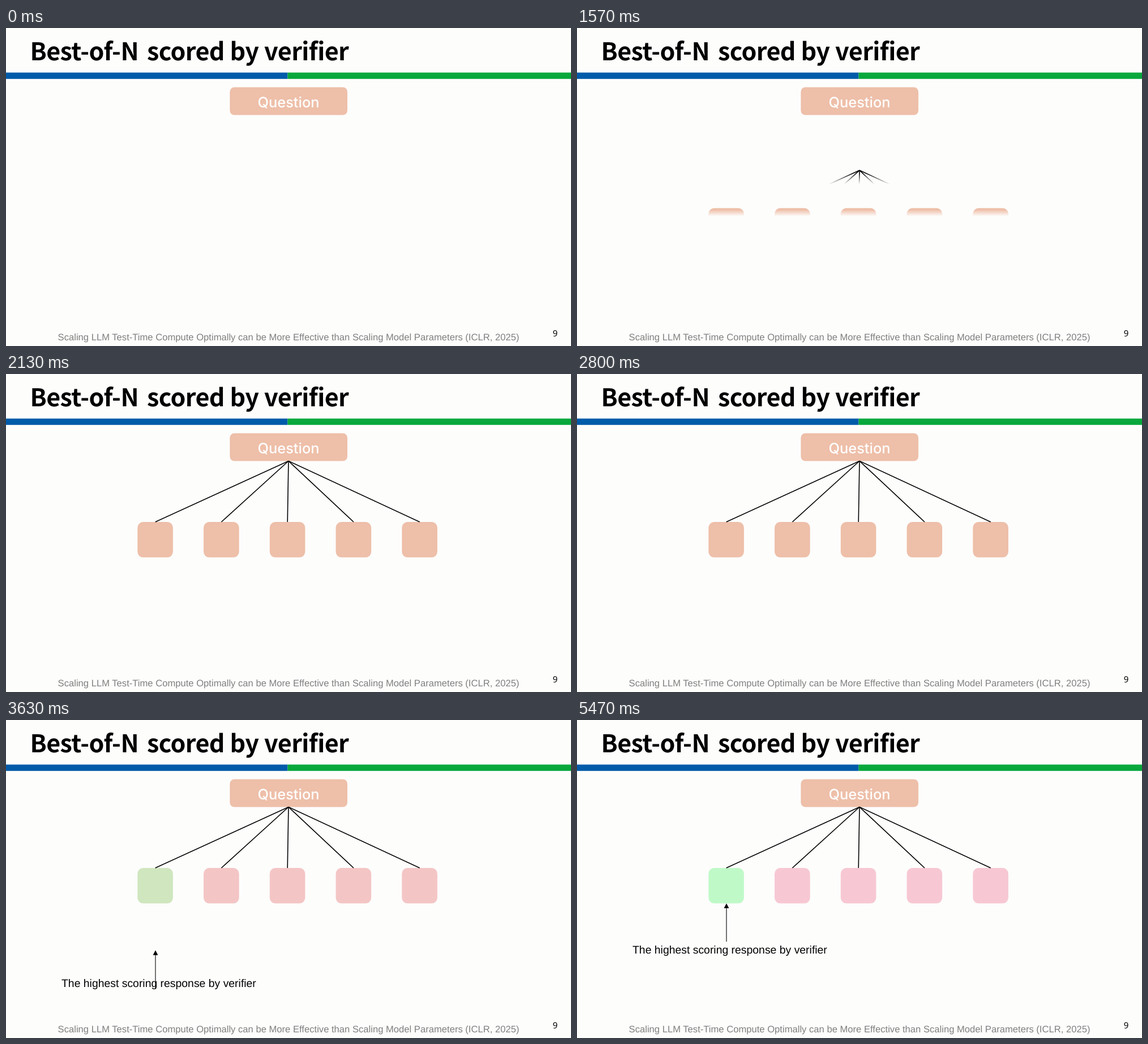
Write an HTML page that moves like this. It is 998x561 px and loops after 5510 ms.

```html
<!DOCTYPE html>
<html lang="en">
<head>
<meta charset="utf-8">
<title>Best-of-N scored by verifier</title>
<style>
  html, body { margin: 0; width: 100%; height: 100%; overflow: hidden; background: #fdfdfc; }
  svg { display: block; width: 998px; height: 561px; }
  text { text-rendering: geometricPrecision; }
  .title { font: 700 43px "Noto Sans CJK KR", "Noto Sans CJK JP", "Noto Sans CJK", "Noto Sans", sans-serif; letter-spacing: -0.6px; }
  .question { font: 500 25.4px Inter, sans-serif; fill: #fff; text-anchor: middle; }
  .cite { font: 16.63px "Liberation Sans", Arial, sans-serif; fill: #7f7f7f; text-anchor: middle; }
  .page { font: 15px "Noto Sans", sans-serif; text-anchor: middle; }
  .note { font: 19.4px "Liberation Sans", Arial, sans-serif; }
</style>
</head>
<body>
<svg viewBox="0 0 998 561">
  <defs id="defs"></defs>
  <text class="title" y="57"><tspan x="42.5">Best-of-N </tspan><tspan x="249">scored </tspan><tspan x="395.5">by </tspan><tspan x="456">verifier</tspan></text>
  <rect y="78.6" width="497.5" height="11.2" fill="#005ba9"/>
  <rect x="497.5" y="78.6" width="500.5" height="11.2" fill="#08a83c"/>
  <rect x="395.4" y="104.4" width="207.6" height="49.2" rx="8" fill="#eebfa9"/>
  <text class="question" x="499" y="139.5">Question</text>
  <text class="cite" x="499" y="551">Scaling LLM Test-Time Compute Optimally can be More Effective than Scaling Model Parameters (ICLR, 2025)</text>
  <text class="page" x="970" y="544">9</text>
  <g id="boxes"></g>
  <g id="lines" stroke="#000" stroke-width="1.6"></g>
  <g id="arrow">
    <path d="M264 330V391" stroke="#000" stroke-width="1.1"/>
    <path d="M264 323.5l4.4 8.6h-8.8z"/>
  </g>
  <text id="note" class="note" x="98" y="411.5">The highest scoring response by verifier</text>
</svg>
<script>
const LOOP = 5510, DURATION = 500, PEEK_AT = 1470, FLY_AT = 3300;
const PEACH = [238, 191, 169], GREEN = [192, 249, 200], PINK = [247, 200, 211];
const byId = id => document.getElementById(id);

function add(parent, tag, attrs) {
  const el = document.createElementNS("http://www.w3.org/2000/svg", tag);
  for (const key in attrs) el.setAttribute(key, attrs[key]);
  return parent.appendChild(el);
}

const boxes = [];
for (let i = 0; i < 5; i++) {
  const x = 232.3 + i * 116.75;
  boxes.push(add(byId("boxes"), "rect", { x, y: 261, width: 62.6, height: 62.6, rx: 10 }));
  add(byId("lines"), "line", { x1: 499, y1: 153.5, x2: x + 31.4, y2: 261 });
}

// Slides a group up into place while a soft edge uncovers it from the top.
function peekIn(id, top, height) {
  const group = byId(id), soft = height * 0.18;
  const fade = add(byId("defs"), "linearGradient", { id: id + "Fade", gradientUnits: "userSpaceOnUse", x1: 0, x2: 0 });
  add(fade, "stop", { offset: 0, "stop-color": "#fff" });
  add(fade, "stop", { offset: 1, "stop-color": "#fff", "stop-opacity": 0 });
  const area = { x: 0, y: 0, width: 998, height: 561 };
  const mask = add(byId("defs"), "mask", { id: id + "Mask", maskUnits: "userSpaceOnUse", ...area });
  add(mask, "rect", { ...area, fill: `url(#${id}Fade)` });

  return p => {
    group.style.display = p > 0 ? "" : "none";
    const edge = top + p * (height + soft);
    fade.setAttribute("y1", edge - soft);
    fade.setAttribute("y2", edge);
    group.setAttribute("mask", p < 1 ? `url(#${id}Mask)` : "none");
    shift(group, height * 1.125 * (1 - p));
  };
}

function shift(el, y) {
  el.setAttribute("transform", `translate(0 ${y})`);
}

function flyIn(id, distance) {
  const el = byId(id);
  return p => {
    el.style.display = p > 0 ? "" : "none";
    shift(el, distance * (1 - p));
  };
}

const peeks = [peekIn("boxes", 261, 62.6), peekIn("lines", 153.5, 107.5)];
const flights = [flyIn("arrow", 248), flyIn("note", 177)];
const progress = (t, start) => Math.min(1, Math.max(0, (t - start) / DURATION));
const mix = (a, b, p) => `rgb(${a.map((v, i) => Math.round(v + (b[i] - v) * p))})`;

// Thirty steps a second, on a 10 ms grid (30, 30, 40).
function stepTime(t) {
  const step = Math.floor(t / 100) * 3 + Math.min(2, Math.floor(t % 100 / 30));
  return step * 100 / 3;
}

function draw(t) {
  const peek = progress(t, PEEK_AT), fly = progress(t, FLY_AT);
  peeks.forEach(set => set(peek));
  flights.forEach(set => set(fly));
  boxes.forEach((box, i) => box.setAttribute("fill", mix(PEACH, i ? PINK : GREEN, fly)));
}

const origin = performance.now();
function tick() {
  draw(stepTime((performance.now() - origin) % LOOP));
  requestAnimationFrame(tick);
}
tick();
</script>
</body>
</html>
```
